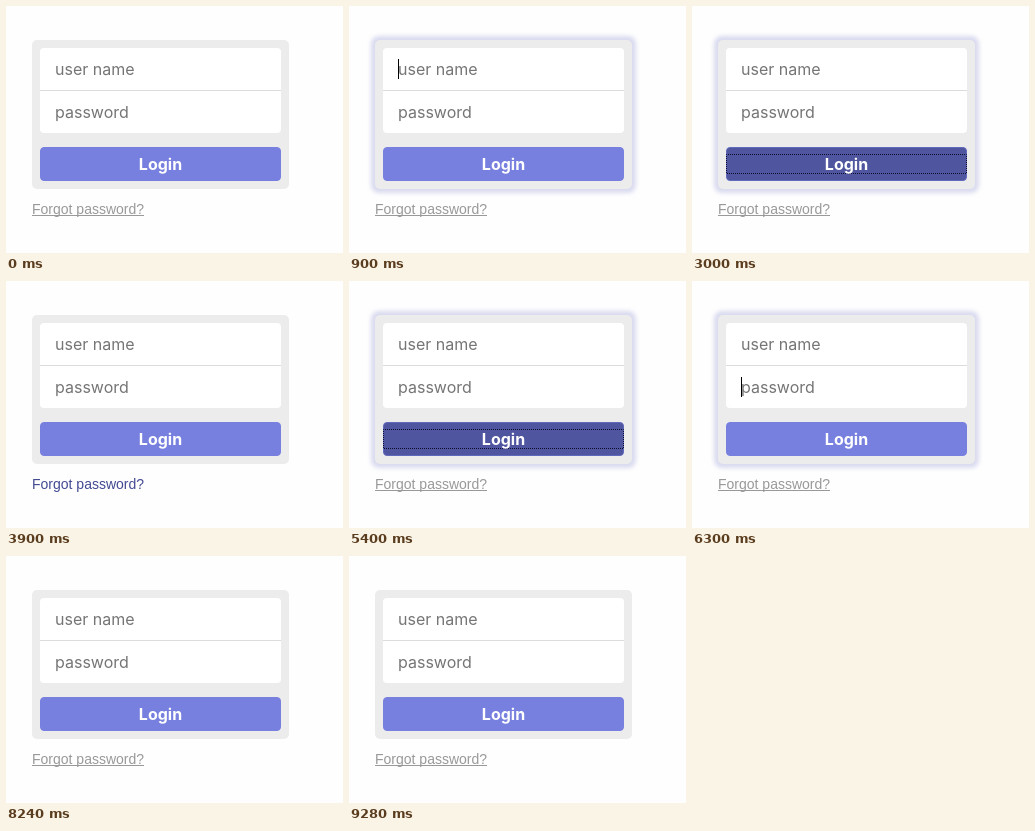
Animation of 337 by 247 pixels, one loop 9.49 s. Source, as an HTML page:

```html
<!DOCTYPE html>
<html lang="en">
<head>
<meta charset="utf-8">
<title>Login form focus</title>
<style>
  html, body { margin: 0; width: 100%; height: 100%; overflow: hidden; background: #fefefe; }
  svg { display: block; }
  text { white-space: pre; }
  .field { font: 16px Inter, sans-serif; fill: #757575; }
  .login { font: 700 16px Inter, sans-serif; fill: #fff; text-anchor: middle; }
  .link { font: 14px "Liberation Sans", Arial, sans-serif; }
</style>
</head>
<body>
<svg width="337" height="247" viewBox="0 0 337 247">
  <defs>
    <filter id="blur" x="-10%" y="-15%" width="120%" height="130%">
      <feGaussianBlur stdDeviation="1.9"/>
    </filter>
  </defs>
  <rect id="glow" x="22" y="30" width="265" height="157" rx="8" fill="#d9daef" filter="url(#blur)"/>
  <rect x="26" y="34" width="257" height="149" rx="5" fill="#ececec"/>

  <rect x="34" y="42" width="241" height="85" rx="4" fill="#fff"/>
  <rect x="34" y="84" width="241" height="1" fill="#dcdcdc"/>
  <text class="field" x="49" y="69">user name</text>
  <text class="field" x="49" y="112">password</text>
  <rect id="caret" x="49" width="1" height="20" fill="#000"/>

  <rect id="button" x="34.5" y="141.5" width="240" height="33" rx="3.5"/>
  <rect id="ring" x="34.5" y="148.5" width="240" height="19" fill="none" stroke="#0b0d2a" stroke-dasharray="1 1" stroke-dashoffset=".5"/>
  <text class="login" x="154.5" y="164">Login</text>

  <text class="link" id="link" x="26" y="208">Forgot password?</text>
  <rect id="underline" x="26" y="209" width="112" height="1" fill="#999"/>
</svg>
<script>
  const LOOP = 9490;
  const CARET_Y = { user: 53, password: 96 };

  // [start ms, focused element, caret visible]
  const steps = [
    [0, 'none'],
    [900, 'user', true],
    [1350, 'user', false],
    [1800, 'password', true],
    [2400, 'password', false],
    [3000, 'login'],
    [3900, 'link'],
    [5400, 'login'],
    [6300, 'password', true],
    [6900, 'password', false],
    [7350, 'user', true],
    [7940, 'user', false],
    [8240, 'none']
  ];

  const $ = id => document.getElementById(id);
  const set = (id, attrs) => {
    for (const name in attrs) $(id).setAttribute(name, attrs[name]);
  };
  const show = (id, on) => set(id, { visibility: on ? 'visible' : 'hidden' });

  function render(ms) {
    const t = ms % LOOP;
    const [, focus, caret] = steps.filter(([start]) => start <= t).pop();
    const onLogin = focus === 'login';
    const onLink = focus === 'link';

    show('glow', onLogin || focus in CARET_Y);
    show('caret', caret);
    set('caret', { y: CARET_Y[focus] || 0 });
    show('ring', onLogin);
    set('button', {
      fill: onLogin ? '#4f559f' : '#7780df',
      stroke: onLogin ? '#6169bd' : '#7780df'
    });
    set('link', { fill: onLink ? '#434a92' : '#999' });
    show('underline', !onLink);
  }

  const origin = performance.now();
  function tick() {
    render(performance.now() - origin);
    requestAnimationFrame(tick);
  }
  render(0);
  requestAnimationFrame(tick);
</script>
</body>
</html>
```
